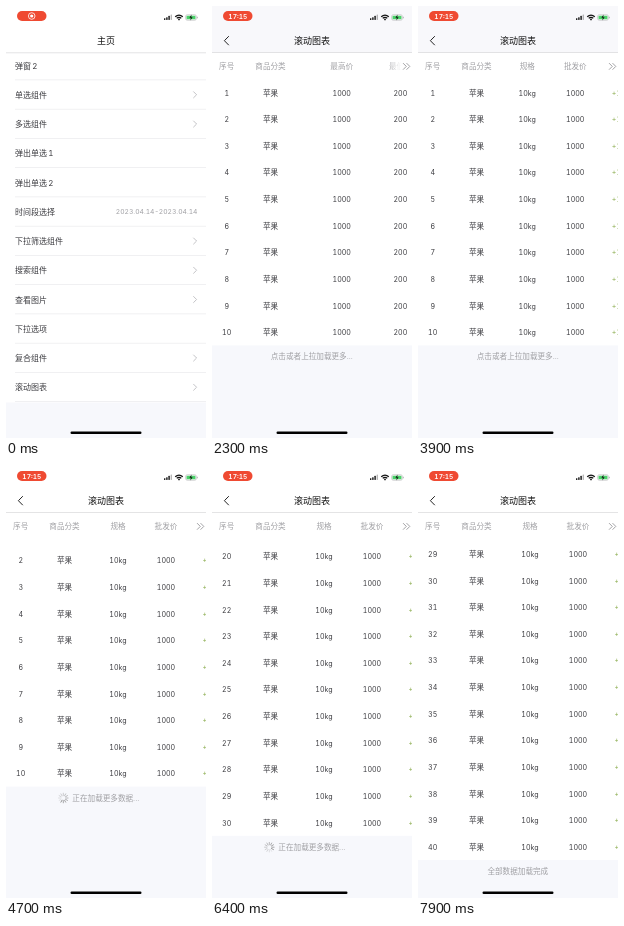
Write an HTML page that moves like this. It is 200 px wide and 432 px high and loops after 8000 ms.

```html
<!DOCTYPE html>
<html lang="zh-CN">
<head>
<meta charset="utf-8">
<title>滚动图表</title>
<style>
html, body { margin: 0; width: 100%; height: 100%; overflow: hidden; background: #fff; }
svg { display: block; width: 200px; height: 432px; }
text { font: 7.6px Inter, "Noto Sans CJK SC", "Noto Sans CJK", sans-serif; fill: #3c3c40; font-variant-numeric: tabular-nums; }
.mid { text-anchor: middle; }
.end { text-anchor: end; }
.title { font-size: 9px; font-weight: 500; fill: #111; }
.item { font-size: 8px; word-spacing: -1px; }
.date { font-size: 6.75px; fill: #a2a2a6; }
.num { font-size: 7.1px; }
.head, .foot { fill: #a0a0a4; }
.up { fill: #8cad50; }
.clock { font-size: 6.7px; font-weight: 600; fill: #fff; }
.line { fill: none; stroke: #b4b4b8; stroke-width: .8; stroke-linecap: round; stroke-linejoin: round; }
.more { stroke: #8c8c90; }
</style>
</head>
<body>
<svg viewBox="0 0 200 432">
  <defs>
    <linearGradient id="fade">
      <stop offset="0" stop-color="#fff" stop-opacity="0"/>
      <stop offset=".6" stop-color="#fff"/>
    </linearGradient>
  </defs>

  <g id="home">
    <rect width="200" height="432" fill="#f7f8fc"/>
    <rect width="200" height="396.5" fill="#fff"/>
    <rect id="tap" y="367.5" width="200" height="29" fill="#ececee"/>
    <g id="menu"></g>
    <rect y="46.5" width="200" height=".7" fill="#d8d8da"/>
    <text class="title mid" x="100" y="38.4">主页</text>
  </g>

  <g id="chart">
    <rect width="200" height="432" fill="#fff"/>
    <g class="scrollY"><g class="scrollX" id="cells"></g></g>
    <rect y="47" width="88" height="385" fill="#fff"/>
    <g class="scrollY" id="keys"></g>
    <g id="footer">
      <rect width="200" height="600" fill="#f7f8fc"/>
      <g id="spinner"></g>
      <text class="foot mid" id="note" x="99.8" y="13.9"></text>
    </g>
    <rect y="46" width="200" height="27.6" fill="#fff"/>
    <g class="scrollX" id="heads"></g>
    <rect y="47" width="88" height="26.6" fill="#fff"/>
    <text class="head mid" x="14.7" y="63.2">序号</text>
    <text class="head mid" x="58.5" y="63.2">商品分类</text>
    <rect x="174" y="47" width="26" height="26.6" fill="url(#fade)"/>
    <path class="line more" d="M191.3 57.4l3 3-3 3M194.8 57.4l3 3-3 3"/>
    <rect id="bar" width="200" height="46.5"/>
    <rect y="46.3" width="200" height=".7" fill="#d8d8da"/>
    <path d="M16.8 30.2l-4.4 4.5 4.4 4.5" fill="none" stroke="#222" stroke-width="1"/>
    <text class="title mid" x="100" y="38.4">滚动图表</text>
  </g>

  <rect x="11" y="5" width="29.5" height="10" rx="5" fill="#ef4a32"/>
  <g id="rec">
    <circle cx="25.7" cy="10" r="3.3" fill="none" stroke="#fff" stroke-width=".8"/>
    <circle cx="25.7" cy="10" r="1.6" fill="#fff"/>
  </g>
  <text class="clock mid" id="clock" x="25.9" y="12.5">17:15</text>
  <g fill="#111">
    <rect x="158" y="12.2" width="1.4" height="1.8" rx=".4"/>
    <rect x="160.2" y="11.2" width="1.4" height="2.8" rx=".4"/>
    <rect x="162.4" y="9.8" width="1.4" height="4.2" rx=".4"/>
    <rect x="164.6" y="8.6" width="1.4" height="5.4" rx=".4" opacity=".3"/>
    <circle cx="173" cy="13.4" r=".9"/>
  </g>
  <path d="M169.2 10.8q3.8-3.4 7.6 0M170.7 12.3q2.3-2 4.6 0" fill="none" stroke="#111" stroke-width="1.2"/>
  <rect x="179.6" y="8.8" width="10.8" height="5.4" rx="1.7" fill="#fff" stroke="#b0b0b3" stroke-width=".6"/>
  <rect x="180.5" y="9.7" width="9" height="3.6" rx=".9" fill="#4cd06a"/>
  <rect x="191" y="10.6" width=".8" height="1.8" rx=".4" fill="#b0b0b3"/>
  <path d="M185.6 8.6l-2.2 3.1h1.5l-.6 2.8 2.3-3.3h-1.5z" fill="#111"/>
  <rect x="64.5" y="425.5" width="71" height="2.4" rx="1.2" fill="#000"/>
</svg>

<script>
const $ = id => document.getElementById(id);
const text = (cls, x, y, s) => `<text class="${cls}" x="${x}" y="${y}">${s}</text>`;
const PITCH = 26.62, LOOP = 8000;

// Menu entries; ">" marks those with an arrow
const menu = ['弹窗 2', '>单选组件', '>多选组件', '弹出单选 1', '弹出单选 2', '时间段选择', '>下拉筛选组件',
  '>搜索组件', '>查看图片', '下拉选项', '>复合组件', '>滚动图表'];
$('menu').innerHTML = menu.map((label, i) => {
  const y = 59.6 + i * 29.25;
  const arrow = label[0] === '>' ? `<path class="line" d="M187.6 ${y - 3.1}l3 3-3 3"/>` : '';
  return text('item', 9, y + 2.9, label.replace('>', '')) + arrow +
    `<rect x="9" y="${y + 14}" width="191" height=".6" fill="#e6e6e9"/>`;
}).join('') + text('date end', 191.5, 208.4, '2023.04.14-2023.04.14');

// Scrolling columns: centre, heading, value, extra class
const columns = [
  [112, '规格', '10kg', ''], [160, '批发价', '1000', ''], [212.5, '涨跌幅', '+10.00%', 'up'],
  [271.7, '最高价', '1000', ''], [330.3, '最低价', '200', '']
];
$('heads').innerHTML = columns.map(([x, name]) => text('head mid', x, 63.2, name)).join('');

let cells = '', keys = '';
for (let i = 0; i < 40; i++) {
  const y = 89.6 + i * PITCH;
  for (const [x, , value, cls] of columns) cells += text('num mid ' + cls, x, y, value);
  keys += text('num mid', 14.7, y, i + 1) + text('mid', 58.5, y, '苹果');
}
$('cells').innerHTML = cells;
$('keys').innerHTML = keys;

for (let i = 0; i < 12; i++) {
  $('spinner').innerHTML += `<path d="M0-2.5V-4.8" transform="rotate(${i * 30})" stroke="#777"
    stroke-width=".8" stroke-linecap="round" opacity="${0.2 + i * 0.06}"/>`;
}

// Smooth curve through [time, value] points without overshoot
function curve(pts) {
  const slope = i => (pts[i + 1][1] - pts[i][1]) / (pts[i + 1][0] - pts[i][0]);
  const tangent = i => {
    if (!i || i === pts.length - 1) return 0;
    const a = slope(i - 1), b = slope(i);
    return a * b > 0 ? 2 * a * b / (a + b) : 0;
  };
  return t => {
    if (t <= pts[0][0]) return pts[0][1];
    const i = pts.findIndex(p => p[0] > t) - 1;
    if (i < 0) return pts[pts.length - 1][1];
    const [t0, a] = pts[i], [t1, b] = pts[i + 1], h = t1 - t0, u = (t - t0) / h;
    return a + (b - a) * u * u * (3 - 2 * u) +
      h * u * (1 - u) * ((1 - u) * tangent(i) - u * tangent(i + 1));
  };
}

const push = curve([[380, 0], [520, .6], [680, .93], [850, 1]]);
const scrollX = curve([[1400, 0], [1800, 65], [2200, 132], [2600, 159.7], [3100, 159.7], [3450, 80], [3750, 14], [4000, 0]]);
const scrollY = curve([[4100, 0], [4450, 22], [4700, 18.8], [4900, 8], [5050, 10], [5400, 176], [5600, 230],
  [5800, 238], [6050, 330], [6300, 490], [6400, 502], [6550, 490], [6750, 477], [7000, 515], [7300, 690], [7600, 749], [7800, 744]]);
const toggle = curve([[1600, 0], [1800, 1]]);

const between = (t, a, b) => t >= a && t < b;
const move = (el, x, y) => el.setAttribute('transform', `translate(${x.toFixed(2)} ${y.toFixed(2)})`);
const moveAll = (cls, x, y) => document.querySelectorAll(cls).forEach(el => move(el, x, y));

function render(t) {
  const p = push(t), sy = scrollY(t);
  move($('home'), -60 * p, 0);
  move($('chart'), 200 * (1 - p), 0);
  $('tap').setAttribute('opacity', between(t, 300, 850) ? 1 : 0);
  $('bar').setAttribute('fill', t < 4100 ? '#f8f8fb' : '#fff');

  moveAll('.scrollX', -scrollX(t), 0);
  moveAll('.scrollY', 0, -sy);

  const rows = t < 4850 ? 10 : t < 5750 ? 20 : t < 6800 ? 30 : 40;
  move($('footer'), 0, 73.2 + rows * PITCH - sy);
  const busy = between(t, 4400, 4850) || between(t, 5550, 5750) || between(t, 6250, 6800);
  $('note').textContent = busy ? '正在加载更多数据...' : rows === 40 ? '全部数据加载完成' : '点击或者上拉加载更多...';
  $('spinner').setAttribute('opacity', busy ? 1 : 0);
  $('spinner').setAttribute('transform', `translate(57.3 11.4) rotate(${Math.floor(t / 83) * 30})`);

  const k = toggle(t);
  $('rec').setAttribute('opacity', 1 - k);
  $('clock').setAttribute('opacity', k);
}

const start = performance.now();
function tick() {
  render((performance.now() - start) % LOOP);
  requestAnimationFrame(tick);
}
tick();
</script>
</body>
</html>
```
